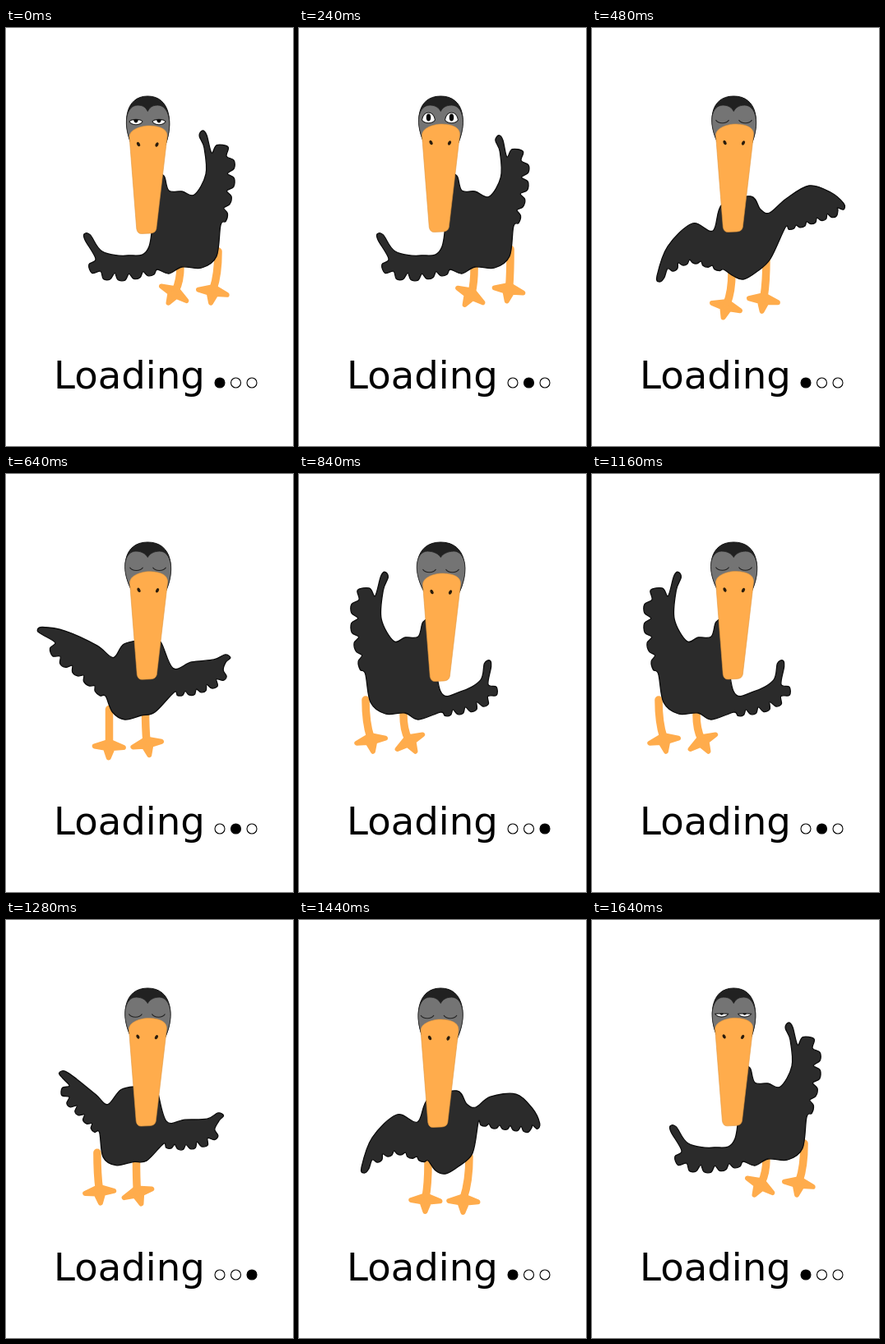
An HTML page for the animation above (1.68 s loop, 349 by 509 pixels).

```html
<!DOCTYPE html>
<html lang="en">
<head>
<meta charset="utf-8">
<title>Loading</title>
<style>
  html, body { margin: 0; width: 100%; height: 100%; overflow: hidden; background: #fff; }
  svg { display: block; width: 349px; height: 509px; }
  text { font: 46.6px "DejaVu Sans", sans-serif; }
  .leg, .foot { stroke: #ffac4c; stroke-linecap: round; stroke-linejoin: round; }
  .leg { fill: none; stroke-width: 9.5; }
  .foot { fill: #ffac4c; stroke-width: 6; }
  #body { fill: #2b2b2b; stroke: #0c0c0c; stroke-width: 1.3; }
  #head { fill: #212121; stroke: #111; }
  #face { fill: #747474; stroke: #222; stroke-width: .8; }
  #beak { fill: #ffac4c; stroke: #e0963f; stroke-width: .6; }
  .lid { fill: #fff; stroke: #222; stroke-width: 1.1; }
  .nostril { fill: #2a1c0c; }
  .dot { stroke: #000; stroke-width: 1.1; }
</style>
</head>
<body>
<svg viewBox="0 0 349 509">
  <defs><clipPath id="slit"><path id="opening"/></clipPath></defs>
  <path class="leg"/><path class="foot"/>
  <path class="leg"/><path class="foot"/>
  <path id="body"/>
  <path id="head"/>
  <path id="face"/>
  <g class="eye"><path class="lid"/><ellipse class="pupil" rx="2.7" ry="4.4" clip-path="url(#slit)"/></g>
  <g class="eye"><path class="lid"/><ellipse class="pupil" rx="2.7" ry="4.4" clip-path="url(#slit)"/></g>
  <path id="beak"/>
  <ellipse class="nostril" rx="1.8" ry="2.8"/>
  <ellipse class="nostril" rx="1.8" ry="2.8"/>
  <text x="58" y="438.5">Loading</text>
  <circle class="dot" cx="260" cy="432" r="6"/>
  <circle class="dot" cx="279.5" cy="432" r="6"/>
  <circle class="dot" cx="299" cy="432" r="6"/>
</svg>
<script>
const LOOP = 1680, STEP = 40, FEATHERS = 5, AXIS = 171.5;
const TIP = 3, RAIL = 4;
const $ = id => document.getElementById(id);
const all = name => [...document.getElementsByClassName(name)];
const mix = (a, b, u) => a + (b - a) * u;
const smooth = u => u * u * (3 - 2 * u);
const add = (p, q, k = 1) => [p[0] + q[0] * k, p[1] + q[1] * k];
const sub = (p, q) => add(p, q, -1);
const mixPt = (p, q, u) => add(p, sub(q, p), u);
const blend = (a, b, u) => a.map((p, i) => mixPt(p, b[i], u));
const unit = ([x, y]) => { const n = Math.hypot(x, y) || 1; return [x / n, y / n]; };
const spin = ([x, y], a) => [x * Math.cos(a) - y * Math.sin(a), x * Math.sin(a) + y * Math.cos(a)];
const points = s => s.split(' ').map(p => p.split(',').map(Number));
const fmt = p => p.map(v => v.toFixed(2)).join(' ');

// A wing is three points of its front edge, the tip, and the four-point rail its feathers grow on.
const shoulder = w => mixPt(w[0], w[w.length - 1], .5);
const turn = (w, angle, size, dx, dy) => {
  const root = shoulder(w);
  return w.map(p => add(add(root, spin(sub(p, root), angle), size), [dx, dy]));
};
const shift = (pts, dx, dy) => pts.map(p => add(p, [dx, dy]));
const leg = (hip, ankle, tilt) => ({ joints: [hip, ankle], tilt });

const leanRight = {
  left: points('174,266 148,277 117,272 95,251 109,281 113,296 146,300 184,294'),
  belly: points('198,299 214,291 238,292 256,278'),
  right: points('229,203 243,178 241,146 239,125 250,152 268,153 270,190 261,240'),
  neck: points('214,199 198,198 192,180 182,185'),
  legs: [leg([212, 290], [206, 320], 30), leg([258, 272], [252, 318], 10)],
  fluff: 10
};
const spreadOut = {
  left: points('147,247 122,238 92,266 82,309 92,293 108,284 124,281 160,294'),
  belly: points('172,302 184,306 200,297 217,281'),
  right: points('236,208 264,192 290,200 306,221 299,222 279,229 253,239 235,243'),
  neck: points('216,225 205,221 193,205 158,215'),
  legs: [leg([170, 298], [164, 336], 15), leg([212, 280], [209, 328], 8)],
  fluff: 6
};
const spreadBack = {
  ...spreadOut,
  left: shift(spreadOut.left, -3, -1),
  belly: shift(spreadOut.belly, -6, 3),
  right: turn(spreadOut.right, .42, .97, -10, 5),
  neck: shift(spreadOut.neck, -1, 3),
  legs: [leg([157, 296], [154, 338], 2), leg([207, 288], [200, 339], 2)]
};
const flip = pts => pts.map(([x, y]) => [2 * AXIS - x, y]);
const leanLeft = {
  left: turn(flip(leanRight.right), 0, 1.08, 0, 2),
  belly: flip(leanRight.belly).reverse(),
  right: turn(flip(leanRight.left), -.36, .88, 8, -3),
  neck: flip(leanRight.neck).reverse(),
  legs: leanRight.legs.map(l => ({ joints: shift(flip(l.joints), -4, 3), tilt: -l.tilt })).reverse(),
  fluff: 10
};
const sway = {
  ...leanRight,
  right: turn(leanRight.right, .03, .96, 1, 2),
  legs: leanRight.legs.map(l => ({
    ...l, joints: l.joints.map(p => add([232, 300], spin(sub(p, [230, 300]), -.1)))
  }))
};

// time, pose, reach of the left wing halfway there
const poseKeys = [
  [0, leanRight], [240, sway, 0], [300, sway, 0], [480, spreadOut, 0], [800, leanLeft, .12],
  [1160, leanLeft, 0], [1440, spreadBack, -.2], [1600, leanRight, 0], [LOOP, leanRight, 0]
];
// time, beak x, beak y, head width
const headKeys = [
  [0, 173.5, 120, 54], [240, 173, 118, 56], [480, 174, 118, 56], [840, 174, 122, 62],
  [1160, 174, 119.5, 59], [1440, 171.5, 122, 56.5], [LOOP, 173.5, 120, 54]
];
const eyeKeys = [[0, .5], [240, 1], [320, 1], [440, 0], [1560, 0], [LOOP, .5]];

function segment(keys, t) {
  let i = 1;
  while (keys[i][0] < t) i++;
  const a = keys[i - 1], b = keys[i];
  return [a, b, (t - a[0]) / (b[0] - a[0])];
}
function sample(keys, t) {
  const [a, b, u] = segment(keys, t);
  return a.slice(1).map((v, i) => mix(v, b[i + 1], u));
}

// Wings swing about the shoulder while their own shape blends.
function swing(a, b, u, reach, wrap) {
  const rest = w => {
    const root = shoulder(w), [x, y] = sub(w[TIP], root);
    let angle = Math.atan2(y, x);
    if (wrap && angle < 0) angle += 2 * Math.PI;
    return { root, angle, local: w.map(p => spin(sub(p, root), -angle)) };
  };
  const f = rest(a), g = rest(b);
  const root = mixPt(f.root, g.root, u), angle = mix(f.angle, g.angle, u);
  const size = 1 + reach * Math.sin(Math.PI * u);
  return blend(f.local, g.local, u).map(p => add(root, spin(p, angle), size));
}

function along(line, u) {
  const lengths = line.slice(1).map((p, i) => Math.hypot(...sub(p, line[i])));
  let rest = u * lengths.reduce((a, b) => a + b), i = 0;
  while (i < lengths.length - 1 && rest > lengths[i]) rest -= lengths[i++];
  return mixPt(line[i], line[i + 1], rest / lengths[i]);
}

// Rounds the tip and grows a row of rounded feathers along the rail.
function plume(wing, fluff, side) {
  const tip = wing[TIP], dir = unit(sub(tip, wing[TIP - 1])), normal = [-dir[1] * side, dir[0] * side];
  const neckOfTip = add(tip, dir, -6), rail = wing.slice(RAIL);
  const edge = [...wing.slice(0, TIP), add(neckOfTip, normal, 4.5), tip, add(neckOfTip, normal, -4.5)];
  for (let i = 0; i < FEATHERS; i++) {
    for (const part of [0, .27, .73]) {
      const u = (i + part) / FEATHERS;
      const d = unit(sub(along(rail, Math.min(1, u + .08)), along(rail, Math.max(0, u - .08))));
      const height = part ? fluff * (1 - .5 * u) : 0;
      edge.push(add(along(rail, u), [-d[1] * side, d[0] * side], height));
    }
  }
  return [...edge, rail[rail.length - 1]];
}

function closedCurve(pts) {
  const n = pts.length, at = i => pts[(i + n) % n];
  let d = 'M' + fmt(pts[0]);
  for (let i = 0; i < n; i++) {
    const c1 = add(at(i), sub(at(i + 1), at(i - 1)), 1 / 6);
    const c2 = add(at(i + 1), sub(at(i), at(i + 2)), 1 / 6);
    d += 'C' + [c1, c2, at(i + 1)].map(fmt).join(' ');
  }
  return d + 'Z';
}

// Three toes with webs between them, closed behind the ankle.
function footPath(ankle, tilt) {
  const ray = (deg, r) => add(ankle, spin([r, 0], (deg + tilt) * Math.PI / 180));
  return 'M' + [ray(270, 3), ray(168, 18), ray(129, 7), ray(90, 17), ray(51, 7), ray(12, 18)]
    .map(fmt).join('L') + 'Z';
}

const put = (el, d) => el.setAttribute('d', d);
const move = (el, x, y, angle = 0) => el.setAttribute('transform', `translate(${x} ${y}) rotate(${angle})`);
const legs = all('leg'), feet = all('foot'), eyes = all('eye'), lids = all('lid');
const pupils = all('pupil'), nostrils = all('nostril'), dots = all('dot');

function drawBody(t) {
  const [from, to, raw] = segment(poseKeys, t), a = from[1], b = to[1], u = smooth(raw);
  const fluff = mix(a.fluff, b.fluff, u);
  put($('body'), closedCurve([
    ...plume(swing(a.left, b.left, u, to[2], true), fluff, 1),
    ...blend(a.belly, b.belly, u),
    ...plume(swing(a.right, b.right, u, 0, false), fluff, -1).reverse(),
    ...blend(a.neck, b.neck, u)
  ]));
  a.legs.forEach((l, i) => {
    const m = b.legs[i], [hip, ankle] = blend(l.joints, m.joints, u);
    put(legs[i], `M${fmt(hip)}Q${fmt([hip[0], mix(hip[1], ankle[1], .6)])} ${fmt(ankle)}`);
    put(feet[i], footPath(ankle, mix(l.tilt, m.tilt, u)));
  });
}

function drawHead(t) {
  const [x, y, width] = sample(headKeys, t), m = 172.3, top = 83;
  const l = m - width / 2, r = m + width / 2, low = y + 26, brow = top + 11, dip = top + 18.5;
  const ex = x - 2.7, ey = y + 130.5;
  put($('head'), `M${x - 19} ${low}C${l - 5} ${y - 3} ${l - 1} ${top} ${m} ${top}
    C${r + 1} ${top} ${r + 5} ${y - 3} ${x + 19} ${low}Z`);
  put($('face'), `M${x - 19} ${low}C${l - 5} ${y - 3} ${l + 1} ${brow} ${l + 15} ${brow}
    C${l + 22} ${brow} ${m - 2} ${dip - 4} ${m} ${dip}
    C${m + 2} ${dip - 4} ${r - 22} ${brow} ${r - 15} ${brow}
    C${r - 1} ${brow} ${r + 5} ${y - 3} ${x + 19} ${low}Z`);
  put($('beak'), `M${x - 23.5} ${y + 12}C${x - 23} ${y + 4} ${x - 10} ${y - 1} ${x} ${y - 1}
    C${x + 11} ${y - 1} ${x + 23} ${y + 2} ${x + 22.5} ${y + 12}
    L${ex + 12} ${ey - 6}Q${ex + 11} ${ey - 1} ${ex + 5} ${ey - .5}
    L${ex - 6} ${ey}Q${ex - 11} ${ey} ${ex - 12} ${ey - 6}Z`);

  const [open] = sample(eyeKeys, t), lift = 8 - 17 * open;
  const eye = `M-8 3C-5 8 5 8 8 3C6 ${lift} -6 ${lift} -8 3Z`;
  put($('opening'), eye);
  [-15.5, 12.5].forEach((dx, i) => {
    move(eyes[i], x + dx, y - 9);
    put(lids[i], open ? eye : 'M-8 3C-5 8 5 8 8 3');
    lids[i].style.fill = open ? '' : 'none';
    pupils[i].style.display = open ? '' : 'none';
  });
  move(nostrils[0], x - 12.5, y + 21.5, -30);
  move(nostrils[1], x + 10, y + 22, 30);
}

function draw(now) {
  const t = Math.floor((now % LOOP) / STEP) * STEP;
  drawBody(t);
  drawHead(t);
  const lit = Math.min(9, Math.floor(t / 160)) % 3;
  dots.forEach((dot, i) => dot.setAttribute('fill', i === lit ? '#000' : '#fff'));
}

const start = performance.now();
function tick() {
  draw(performance.now() - start);
  requestAnimationFrame(tick);
}
tick();
</script>
</body>
</html>
```
